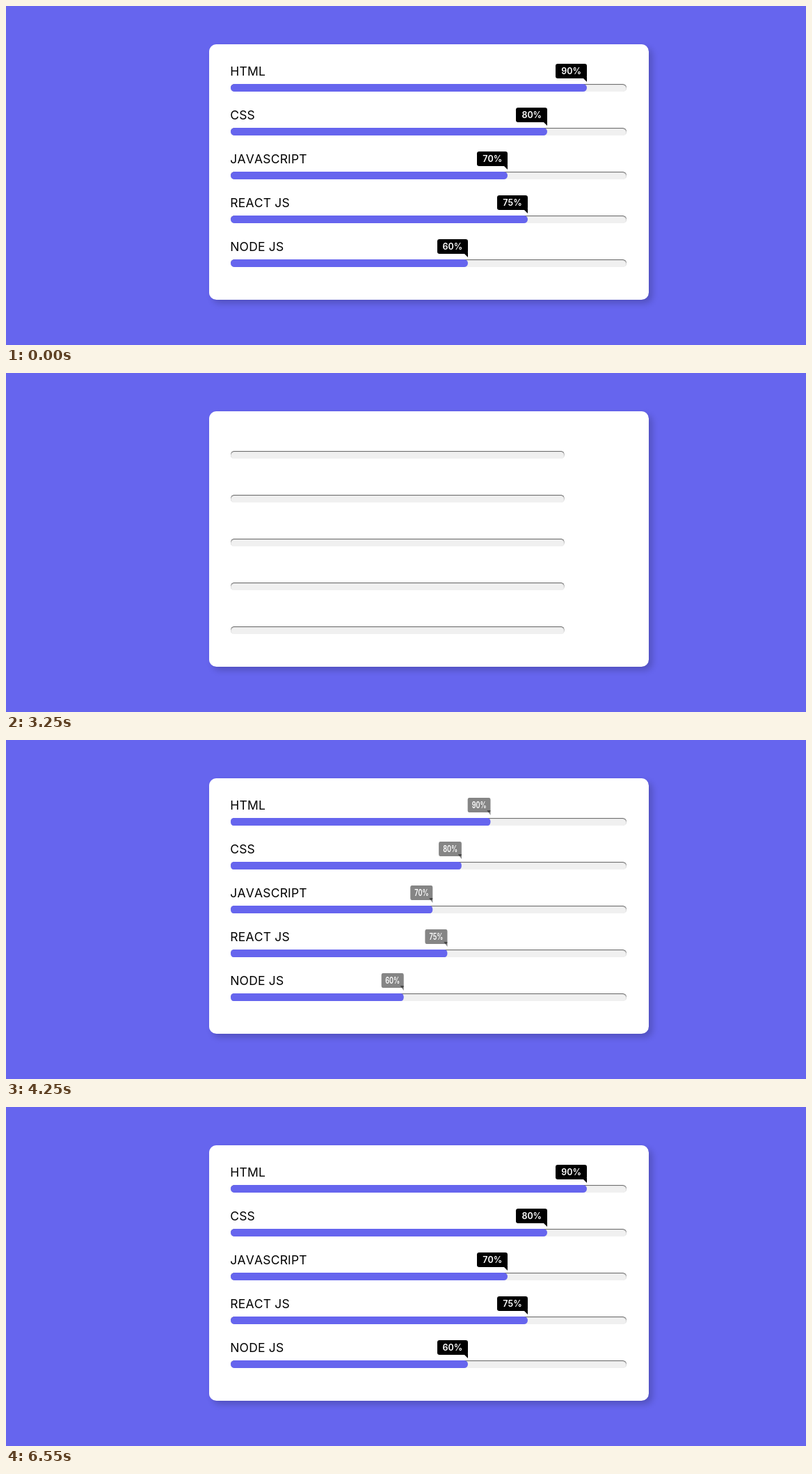
Animation of 1150x487 px, one loop 7740 ms. Source, as an HTML page:

```html
<!DOCTYPE html>
<html lang="en">
<head>
<meta charset="utf-8">
<title>Skill bars</title>
<style>
  html, body { margin: 0; width: 100%; height: 100%; overflow: hidden; background: #6665ee; }
  body { position: relative; font-family: Inter, Roboto, sans-serif; font-kerning: none; }
  .card {
    position: absolute; left: 291.5px; top: 54.7px; width: 632px; height: 367.3px;
    border-radius: 10.6px; background: #fff; box-shadow: 5px 5px 10px rgba(0, 0, 0, .2);
  }
  .row { position: absolute; left: 323px; width: 569px; height: 40px; }
  .title {
    position: absolute; left: -.8px; top: 0; font-size: 17.5px; line-height: 24px;
    letter-spacing: .2px; white-space: nowrap; color: #000;
  }
  .line, .fill { position: absolute; left: 0; border-radius: 10px; transform-origin: left; }
  .line {
    top: 30px; width: 100%; height: 10.7px; background: #f0f0f0;
    box-shadow: inset 0 1.06px 1.06px rgba(0, 0, 0, .6);
  }
  .fill { top: 0; height: 100%; background: #6665ee; }
  .tail {
    position: absolute; right: 0; top: -10.6px; border: 7.4px solid transparent;
    border-width: 7.4px 0 0 7.4px; border-top-color: #000;
  }
  .tip {
    position: absolute; right: 0; top: -29.5px; padding: 0 8px; border-radius: 3.2px;
    background: #000; color: #fff; font-size: 12.5px; font-weight: 600; line-height: 21.7px;
  }
  #cursor { position: absolute; left: 0; top: 0; }
</style>
</head>
<body>
<div class="card"></div>
<svg id="cursor" width="12" height="17">
  <path d="M.5 .5V13L3.6 10.2 5.8 15.3 8 14.4 5.9 9.4H10Z" fill="#000" stroke="#fff"/>
</svg>
<script>
const LOOP = 7740, RELOAD = 2540;
const skills = [['HTML', 90], ['CSS', 80], ['JAVASCRIPT', 70], ['REACT JS', 75], ['NODE JS', 60]];
// [loop ms, ms since the page was reloaded]
const clock = [[2520, 0], [3770, 1322], [4250, 1737], [4520, 2000]];
// Pointer visits: [loop ms, x, y]
const visits = [
  [[230, 944, 439], [330, 590, 290], [450, 340, 159], [660, 340, 159], [780, 130, -10]],
  [[5110, 406, -4], [5200, 505, 95], [5310, 591, 167], [5540, 591, 167],
   [5740, 979, 355], [5970, 979, 355], [6550, 1034, 487]]
];

const cursor = document.getElementById('cursor');
skills.forEach(([name, percent], i) => {
  cursor.insertAdjacentHTML('beforebegin', `
    <div class="row" style="top:${82.2 + 63 * i}px">
      <div class="title">${name}</div>
      <div class="line"><div class="fill" style="width:${percent}%">
        <i class="tail"></i><span class="tip">${percent}%</span>
      </div></div>
    </div>`);
});

const clamp = v => Math.min(1, Math.max(0, v));

// Linear interpolation through keys whose first entry is the time
function track(keys, t) {
  let i = 1;
  while (i < keys.length - 1 && t > keys[i][0]) i++;
  const a = keys[i - 1], b = keys[i], k = clamp((t - a[0]) / (b[0] - a[0]));
  return a.slice(1).map((v, j) => v + (b[j + 1] - v) * k);
}

// cubic-bezier(1, 0, .5, 1)
function ease(x) {
  x = clamp(x);
  if (x === 0 || x === 1) return x;
  let lo = 0, hi = 1, s;
  for (let i = 0; i < 24; i++) {
    s = (lo + hi) / 2;
    if (3 * s * (1 - s) ** 2 + 1.5 * s * s * (1 - s) + s ** 3 < x) lo = s;
    else hi = s;
  }
  return s * s * (3 - 2 * s);
}

function setAll(selector, prop, value) {
  for (const el of document.querySelectorAll(selector)) el.style[prop] = value;
}

function draw(now) {
  const t = now % LOOP;
  const age = t < RELOAD ? 2000 : track(clock, t)[0];
  setAll('.line', 'transform', `scaleX(${ease(age / 1000)})`);
  setAll('.fill', 'transform', `scaleX(${ease(age / 1000 - 1)})`);
  setAll('.title', 'opacity', clamp((age - 1000) / 500));
  setAll('.tail, .tip', 'opacity', clamp((age - 1500) / 500));

  const path = visits.find(v => t >= v[0][0] && t < v[v.length - 1][0]);
  cursor.style.visibility = path ? 'visible' : 'hidden';
  if (path) {
    const [x, y] = track(path, t);
    cursor.style.transform = `translate(${x}px, ${y}px)`;
  }
  requestAnimationFrame(draw);
}
requestAnimationFrame(draw);
</script>
</body>
</html>
```
